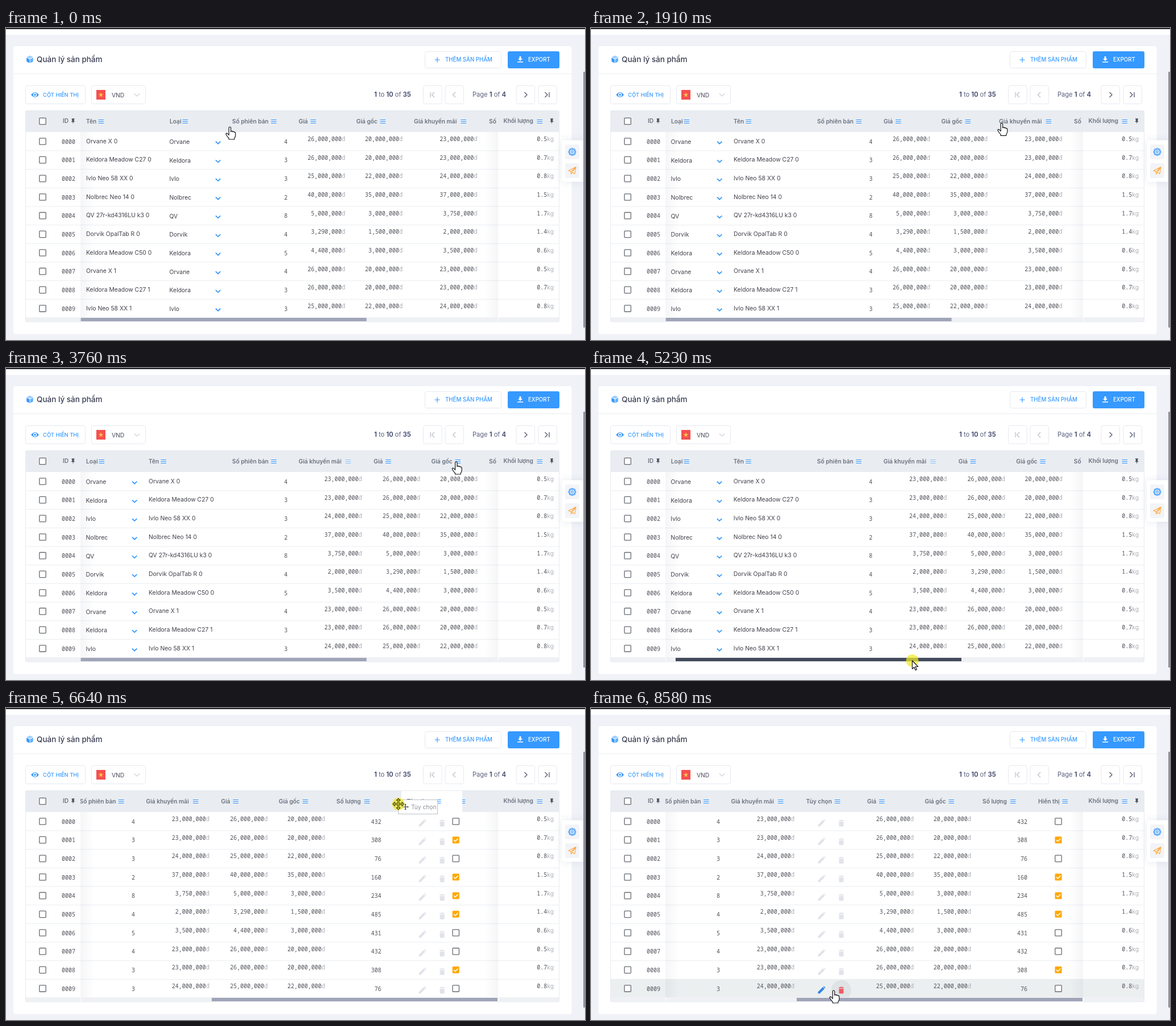
An HTML page that plays this animation: 1019 px wide and 549 px high, repeating every 8.73 s.

```html
<!DOCTYPE html>
<html lang="vi">
<head>
<meta charset="utf-8">
<title>Quản lý sản phẩm</title>
<style>
  html, body { margin: 0; width: 100%; height: 100%; overflow: hidden; background: #f1f2f8; }
  svg { display: block; width: 1019px; height: 549px; font-family: Inter, sans-serif; }
  .mono { font: 10px "Noto Sans Mono", monospace; fill: #50525a; }
  .unit { font: 10.3px Inter, sans-serif; fill: #adafb8; }
  .cell { font-size: 10.4px; fill: #40424b; }
  .head { font-size: 10.2px; font-weight: 600; fill: #6b717f; }
  .caps { font-size: 9.7px; font-weight: 500; fill: #3699ff; }
  .page { font-size: 11.1px; fill: #5a6180; }
  .page tspan { font-weight: 700; fill: #4a5175; }
  .line { fill: none; stroke: #3699ff; stroke-width: 1.4; }
  .frame { fill: #fff; stroke: #e6e9f0; }
</style>
</head>
<body>
<svg id="stage" viewBox="0 0 1019 549"></svg>
<script>
const LOOP = 8730, VIEW_L = 131, VIEW_R = 866, HEAD_Y = 145.5, ROW_Y = 183, ROW_H = 32.67;
const MAX_SCROLL = 268.5, MAX_THUMB = 230.5;
const BLUE = '#3699ff';

// name, type, versions, price, cost, sale (thousands), quantity, shown, weight
const goods = [
  ['Orvane X', 'Orvane', 4, 26000, 20000, 23000, 432, 0, '0.5'],
  ['Keldora Meadow C27', 'Keldora', 3, 26000, 20000, 23000, 308, 1, '0.7'],
  ['Ivlo Neo 58 XX', 'Ivlo', 3, 25000, 22000, 24000, 76, 0, '0.8'],
  ['Nolbrec Neo 14', 'Nolbrec', 2, 40000, 35000, 37000, 160, 1, '1.5'],
  ['QV 27r-kd4316LU k3', 'QV', 8, 5000, 3000, 3750, 234, 1, '1.7'],
  ['Dorvik OpalTab R', 'Dorvik', 4, 3290, 1500, 2000, 485, 1, '1.4'],
  ['Keldora Meadow C50', 'Keldora', 5, 4400, 3000, 3500, 431, 0, '0.6']
];
const rows = Array.from({ length: 10 }, (_, i) => goods[i % 7]);
const mid = i => 199.5 + ROW_H * i;

const text = (x, y, s, cls, extra = '') => `<text x="${x}" y="${y}" class="${cls}" ${extra}>${s}</text>`;
const rect = (x, y, w, h, fill, extra = '') =>
  `<rect x="${x}" y="${y}" width="${w}" height="${h}" fill="${fill}" ${extra}/>`;
const frame = (x, y, w, h) => `<rect x="${x}" y="${y}" width="${w}" height="${h}" rx="3" class="frame"/>`;
const path = (d, extra = '') => `<path d="${d}" ${extra}/>`;
const at = (x, y, s, extra = '') => `<g transform="translate(${x} ${y})" ${extra}>${s}</g>`;
const END = 'text-anchor="end"';

const menu = (x, cls = '') => path(`M${x} 161.5h9.500m-9.500 3h9.500m-9.500 3h9.500`, `class="line ${cls}" style="stroke-width:1.100"`);
const pin = x => at(x, 163.5, path('M-3-5H3V-4L2-3V0L4 2H.6V5H-.6V2H-4L-2 0V-3L-3-4Z', 'fill="#4b4f5c" transform="scale(.85)"'));
const box = (x, y, on) => on
  ? rect(x - 6, y - 6, 12, 12, '#ffa800', 'rx="1.5"') + path(`M${x - 3.5} ${y}l2.5 2.6 4.8-5`, 'fill="none" stroke="#fff" stroke-width="1.5"')
  : rect(x - 5.7, y - 5.7, 11.4, 11.4, '#fff', 'rx="1" stroke="#666a70" stroke-width="1.3"');
const money = (x, k, y) => text(x, y, `${k.toLocaleString('en-US')},000<tspan class="unit">đ</tspan>`, 'mono', END);
const count = (x, n, y) => text(x, y, n, 'mono', END);
const crossArrows = 'M0-9L3-6H1V-1H6V-3L9 0 6 3V1H1V6H3L0 9-3 6H-1V1H-6V3L-9 0-6-3V-1H-1V-6H-3Z';
const pencil = 'M-6 6V3L2.500-5.500 5.500-2.500-3 6ZM3.300-6.300L4.300-7.300 7.300-4.300 6.300-3.300Z';
const bin = 'M-4.500-5H-2L-1.200-6H1.200L2-5H4.500V-3.500H-4.500ZM-4-2.500H4V5Q4 6 3 6H-3Q-4 6-4 5Z';

const cols = {
  name: { w: 147, label: 'Tên', icon: 31.5, ghost: 45, cell: (r, i, y) => text(10, y + 3.3, `${r[0]} ${i < 7 ? 0 : 1}`, 'cell') },
  type: { w: 110, label: 'Loại', icon: 32.5, cell: (r, i, y) => text(9.5, y + 4.5, r[1], 'cell') +
    path(`M91 ${y + .2}l4.200 4 4.200-4`, 'class="line" style="stroke-width:1.8"') },
  vers: { w: 117, label: 'Số phiên bản', icon: 78.5, cell: (r, i, y) => count(107.5, r[2], y + 4) },
  price: { w: 101.5, label: 'Giá', icon: 31, cell: (r, i, y) => money(92, r[3], y - .5) },
  cost: { w: 101.5, label: 'Giá gốc', icon: 52, cell: (r, i, y) => money(91.5, r[4], y - .5) },
  sale: { w: 132, label: 'Giá khuyến mãi', icon: 92.5, ghost: 94, cell: (r, i, y) => money(121.5, r[5], y - .5) },
  qty: { w: 98, label: 'Số lượng', icon: 59, cell: (r, i, y) => count(89, r[6], y + 4) },
  show: { w: 91, label: 'Hiển thị', icon: 52.5, cell: (r, i, y) => box(45.5, y, r[7]) },
  opts: { w: 107.5, label: 'Tùy chọn', icon: 60.5, ghost: 69, cell: (r, i, y) =>
    `<circle class="spot" cx="72" cy="${y + 3}" r="17.5" fill="#e0e3e5" visibility="hidden"/>` +
    at(37, y + 3, path(pencil), 'class="edit"') + at(72, y + 3, path(bin), 'class="bin"') }
};
const keys = Object.keys(cols);

// Column orders and when each one takes effect
const orders = [
  [0, 'name type vers price cost sale qty show opts'],
  [1119, 'type name vers price cost sale qty show opts'],
  [2262, 'type name vers price sale cost qty show opts'],
  [2630, 'type name vers sale price cost qty show opts'],
  [6472, 'type name vers sale price cost qty opts show'],
  [6720, 'type name vers sale price cost opts qty show'],
  [6880, 'type name vers sale price opts cost qty show'],
  [7030, 'type name vers sale opts price cost qty show']
].map(([start, list]) => {
  const left = {};
  list.split(' ').reduce((x, k) => (left[k] = x, x + cols[k].w), VIEW_L);
  return { start, left };
});

const drags = [['name', 960, 1500], ['sale', 2200, 3030], ['opts', 6230, 7200]];
const presses = [[890, 1500], [2150, 3030], [5090, 5760], [6210, 7200]];
const within = (t, a, b) => t >= a && t < b;

const track = [
  [0, 394, 174], [70, 394, 174], [300, 350, 180], [800, 200, 168], [910, 192, 165], [990, 195, 165],
  [1220, 305, 168], [1400, 345, 168], [1500, 350, 168], [1840, 704, 167], [2070, 765, 168],
  [2230, 763, 168], [2290, 722, 168], [2530, 600, 168], [2750, 530, 167], [2950, 507, 166],
  [3140, 507, 166], [3760, 792, 165], [3990, 849, 164], [4220, 857, 166], [4370, 855, 170],
  [4650, 790, 240], [5080, 548, 514], [5130, 548, 515], [5230, 565, 515], [5750, 779, 515],
  [5850, 785, 516], [6170, 800, 161], [6250, 800, 165], [6470, 730, 168], [6600, 691, 169],
  [6640, 691, 169], [6900, 560, 168], [7100, 420, 168], [7250, 415, 168], [7350, 418, 172],
  [8040, 440, 400], [8270, 440, 500], [8420, 437, 503], [8580, 427, 497], [LOOP, 427, 497]
];

function pointer(t) {
  const n = Math.max(1, track.findIndex(p => p[0] >= t));
  const [a, b] = [track[n - 1], track[n]];
  const u = Math.max(0, (t - a[0]) / (b[0] - a[0]));
  return { x: a[1] + (b[1] - a[1]) * u, y: a[2] + (b[2] - a[2]) * u };
}

// CSS "ease": cubic-bezier(.25, .1, .25, 1)
function ease(x) {
  if (x <= 0) return 0;
  if (x >= 1) return 1;
  const curve = (u, a, b) => 3 * (1 - u) * (1 - u) * u * a + 3 * (1 - u) * u * u * b + u * u * u;
  let lo = 0, hi = 1;
  for (let i = 0; i < 24; i++) {
    const m = (lo + hi) / 2;
    curve(m, .25, .25) < x ? lo = m : hi = m;
  }
  return curve(lo, .1, 1);
}

function columnLeft(key, t) {
  let from = orders[0].left[key], to = from, start = 0;
  const value = time => from + (to - from) * ease((time - start) / 400);
  for (const o of orders) {
    if (o.start > t) break;
    if (o.left[key] !== to) {
      from = value(o.start);
      to = o.left[key];
      start = o.start;
    }
  }
  return value(t);
}

function thumbShift(t) {
  if (t < 5130) return 0;
  return t > 5750 ? MAX_THUMB : Math.min(MAX_THUMB, pointer(t).x - 548);
}

function shell() {
  const pageBtn = (x, d, c) => frame(x, 101.5, 32.5, 32) + path(d, `fill="none" stroke="${c}" stroke-width="1.3"`);
  const teeth = Array.from({ length: 8 }, (_, i) => path('M-1.8-4.600L-1.200-6.300H1.200L1.800-4.600', `transform="rotate(${i * 45})"`)).join('');
  return rect(0, 0, 1019, 549, '#f1f2f8') + rect(0, 0, 1019, 12, '#fff') + rect(0, 0, 1019, 2, '#202127') +
    rect(13, 32, 982.5, 506.5, '#fff', 'rx="4"') + rect(13, 80, 982.5, 1, '#ebedf3') +
    path('M42 48.5L47.8 51.2 42 54 36.2 51.2Z', 'fill="#9ccfff"') +
    path('M36.2 52.3L41.5 55V61.8L36.2 59Z', `fill="${BLUE}"`) +
    path('M47.8 52.3L42.5 55V61.8L47.8 59Z', 'fill="#63b1ff"') +
    text(54, 59.5, 'Quản lý sản phẩm', '', 'font-size="13.5" font-weight="500" fill="#3a3d51"') +
    frame(737.5, 41.5, 134, 29) + path('M754.5 56h9m-4.5-4.5v9', 'class="line" style="stroke-width:1.2"') + text(773, 59.3, 'THÊM SẢN PHẨM', 'caps') +
    rect(883, 41, 91, 30, BLUE, 'rx="3"') +
    path('M903.5 50h3v4h2.5l-4 4-4-4h2.5ZM900 59h10v1.5h-10Z', 'fill="#fff"') +
    text(919, 59.3, 'EXPORT', 'caps', 'style="fill:#fff"') +
    frame(34.5, 101.5, 105, 32) +
    path('M44 117.5Q51 109 58 117.5 51 126 44 117.5Z', `fill="${BLUE}"`) +
    '<circle cx="51" cy="117.5" r="3.2" fill="#fff"/>' + `<circle cx="51" cy="117.5" r="1.8" fill="${BLUE}"/>` +
    text(65, 121, 'CỘT HIỂN THỊ', 'caps', 'style="font-size:9.4px"') +
    frame(150.5, 101.5, 95, 32) + rect(159, 109, 16, 17, '#f4504f') +
    path('M167 113l1.100 3.300h3.400l-2.800 2 1.100 3.300-2.800-2-2.800 2 1.100-3.300-2.800-2h3.400Z', 'fill="#ffc34d"') +
    text(186, 121.5, 'VND', '', 'font-size="10.3" fill="#464a59"') +
    path('M226 115.5l4.5 4.5 4.5-4.5', 'fill="none" stroke="#cfd2da" stroke-width="1.2"') +
    text(648, 121.2, '<tspan>1</tspan> to <tspan>10</tspan> of <tspan>35</tspan>', 'page') +
    text(821, 121.2, 'Page <tspan>1</tspan> of <tspan>4</tspan>', 'page') +
    pageBtn(734.5, 'M747 113v9m7-9l-4.5 4.5 4.5 4.5', '#bcc0cc') +
    pageBtn(773, 'M791 113l-4.5 4.5 4.5 4.5', '#bcc0cc') +
    pageBtn(898, 'M912.5 113l4.5 4.5-4.5 4.5', '#555b70') +
    pageBtn(937, 'M948.5 113l4.5 4.5-4.5 4.5m7.5-9v9', '#555b70') +
    rect(978, 197.5, 50, 73, '#fff', 'rx="4" filter="url(#soft)"') +
    rect(984, 205, 25, 26, '#f3f4f7', 'rx="3"') + rect(984, 238, 25, 26, '#f3f4f7', 'rx="3"') +
    at(996.5, 218, teeth + '<circle r="4.6"/><circle r="1.9"/>', `fill="none" stroke="${BLUE}" stroke-width="1.1"`) +
    path('M990 251L1003 244.5 1001 256.5 996.5 254.2 994.5 257V253ZM994.5 253L1003 244.5 996.5 254.2', 'fill="none" stroke="#ffa63a" stroke-width="1.1" stroke-linejoin="round"') +
    rect(1016, 77, 3, 450, '#92949f');
}

function table() {
  const lines = rows.map((_, i) => rect(34, mid(i) + 16, 940, 1, '#e9edf2')).join('');
  const heads = keys.map(k => `<g id="head-${k}">` +
    rect(0, 146, cols[k].w, 37, '#fff', 'class="lift" visibility="hidden"') +
    text(10, 167.7, cols[k].label, 'head') + menu(cols[k].icon, 'bars') + '</g>').join('');
  const bodies = keys.map(k => `<g id="body-${k}">${rows.map((r, i) => cols[k].cell(r, i, mid(i))).join('')}</g>`).join('');
  const pinned = rows.map((r, i) => box(64.5, mid(i), 0) +
    text(98, mid(i) + 4, '000' + i, 'mono') +
    text(964, mid(i) - .5, `${r[8]}<tspan class="unit">kg</tspan>`, 'mono', END)).join('');
  return rect(34, HEAD_Y, 940, ROW_Y - HEAD_Y, '#e9edf1') +
    rect(34, 0, 940, ROW_H, '#eceff0', 'id="hover"') + lines +
    `<g clip-path="url(#view)">${bodies}<g id="heads">${heads}</g></g>` +
    rect(VIEW_L, ROW_Y, 24, 326, 'url(#fadeL)') + rect(VIEW_R - 24, ROW_Y, 24, 326, 'url(#fadeR)') +
    box(64.5, 164, 0) + text(100, 167.3, 'ID', 'head') + pin(118) +
    text(875.5, 167.3, 'Khối lượng', 'head') + menu(934.5) + pin(960.5) + pinned +
    rect(34, 509, 940, 8, '#f0f1f5') + rect(131, 509, 1, 8, '#fff') + rect(866, 509, 1, 8, '#fff') +
    rect(131.5, 510, 503, 6, '#a0a4b8', 'id="thumb"') +
    rect(34.5, 145.5, 939, 371.5, 'none', 'stroke="#e6eaf0" rx="3"');
}

const handShape = 'M-1.700 1.700a1.700 1.700 0 0 1 3.400 0V8.500q.3-1.300 1.700-1.200 1.300.1 1.400 1.500.4-1 1.600-.8 1.200.2 1.200 1.600.5-.6 1.300-.3 1 .4 1 1.600V15q0 2.500-2 5v2H-1.800v-2q-3-3-4.800-6.500-.8-2 .6-2.400 1.200-.3 2.400 1.200l1.900 2Z';
const arrowShape = 'M0 0V14.500L3.300 11.400 5.600 16.800 7.900 15.800 5.600 10.500H10.200Z';
const outline = 'fill="#fff" stroke="#15161a" stroke-width="1.2" stroke-linejoin="round"';

const stage = document.getElementById('stage');
stage.innerHTML = `<defs>
  <clipPath id="view"><rect x="${VIEW_L}" y="145" width="${VIEW_R - VIEW_L}" height="364"/></clipPath>
  <linearGradient id="fadeL"><stop stop-color="#596080" stop-opacity=".06"/><stop offset="1" stop-color="#596080" stop-opacity="0"/></linearGradient>
  <linearGradient id="fadeR"><stop stop-color="#596080" stop-opacity="0"/><stop offset="1" stop-color="#596080" stop-opacity=".06"/></linearGradient>
  <filter id="soft" x="-50%" y="-50%" width="200%" height="200%"><feDropShadow dx="0" dy="0" stdDeviation="6" flood-color="#525f8c" flood-opacity=".14"/></filter>
  </defs>` + shell() + table() +
  `<g id="ghost">${rect(.5, .5, 45, 25, '#fff', 'id="ghostBox" stroke="#bcc0c5"')}` +
  at(13, 13, path(crossArrows, 'transform="scale(.62)" fill="#33353d"')) +
  `<text id="ghostText" x="23" y="17" font-size="10.2" fill="#8c9097"></text></g>` +
  `<g id="cursor"><circle id="glow" r="11" fill="#f0ea2a" opacity=".72"/>` +
  path(crossArrows, 'id="move" fill="#f5ed45" stroke="#4a4710" stroke-width="1.1" transform="scale(1.08)"') +
  path(handShape, `id="hand" ${outline}`) + path(arrowShape, `id="arrow" ${outline}`) + '</g>';

const $ = id => document.getElementById(id);
const show = (el, on) => el.setAttribute('visibility', on ? 'visible' : 'hidden');
const place = (el, x, y) => el.setAttribute('transform', `translate(${x.toFixed(2)} ${y.toFixed(2)})`);
const parts = keys.map(k => ({ k, head: $('head-' + k), body: $('body-' + k), lift: $('head-' + k).querySelector('.lift') }));
const all = cls => [...stage.querySelectorAll(cls)];
const pencils = all('.edit'), bins = all('.bin'), spots = all('.spot');
const saleBars = $('head-sale').querySelector('.bars');

function draw(t) {
  const p = pointer(t);
  const drag = drags.find(d => within(t, d[1], d[2]));
  const pressed = presses.some(d => within(t, ...d));
  const scroll = thumbShift(t - 100) * MAX_SCROLL / MAX_THUMB;

  for (const { k, head, body, lift } of parts) {
    const x = columnLeft(k, t) - scroll;
    place(head, x, 0);
    place(body, x, 0);
    const up = !!drag && drag[0] === k;
    show(lift, up);
    if (up && head.nextSibling) $('heads').append(head);
  }
  saleBars.setAttribute('opacity', within(t, 3030, 5800) ? .5 : 1);

  const row = drag || pressed || p.y < ROW_Y || p.y > 509 ? -1 : Math.min(9, Math.floor((p.y - ROW_Y) / ROW_H));
  show($('hover'), row >= 0);
  $('hover').setAttribute('y', mid(Math.max(0, row)) - 16.5);
  const optX = columnLeft('opts', t) - scroll;
  const onIcon = row >= 0 && Math.abs(p.y - mid(row) - 3) < 16 && p.x > optX + 20 && p.x < optX + 90;
  rows.forEach((_, i) => {
    pencils[i].setAttribute('fill', i === row ? '#2f86e6' : '#e1e3ea');
    bins[i].setAttribute('fill', i === row ? '#ee5a63' : '#e1e3ea');
    show(spots[i], i === row && onIcon && p.x > optX + 54);
  });

  $('thumb').setAttribute('x', 131.5 + thumbShift(t));
  $('thumb').setAttribute('fill', within(t, 5050, 5800) ? '#434b5b' : '#a0a4b8');

  show($('ghost'), !!drag);
  if (drag) {
    const late = pointer(t - 20);
    place($('ghost'), late.x - 1, late.y - 8);
    $('ghostBox').setAttribute('width', cols[drag[0]].ghost);
    $('ghostText').textContent = cols[drag[0]].label;
  }

  const hand = !drag && (p.y < ROW_Y || onIcon);
  place($('cursor'), p.x, p.y);
  show($('glow'), pressed);
  show($('move'), !!drag);
  show($('hand'), hand);
  show($('arrow'), !drag && !hand);
}

const began = performance.now();
function tick() {
  draw((performance.now() - began) % LOOP);
  requestAnimationFrame(tick);
}
tick();
</script>
</body>
</html>
```
